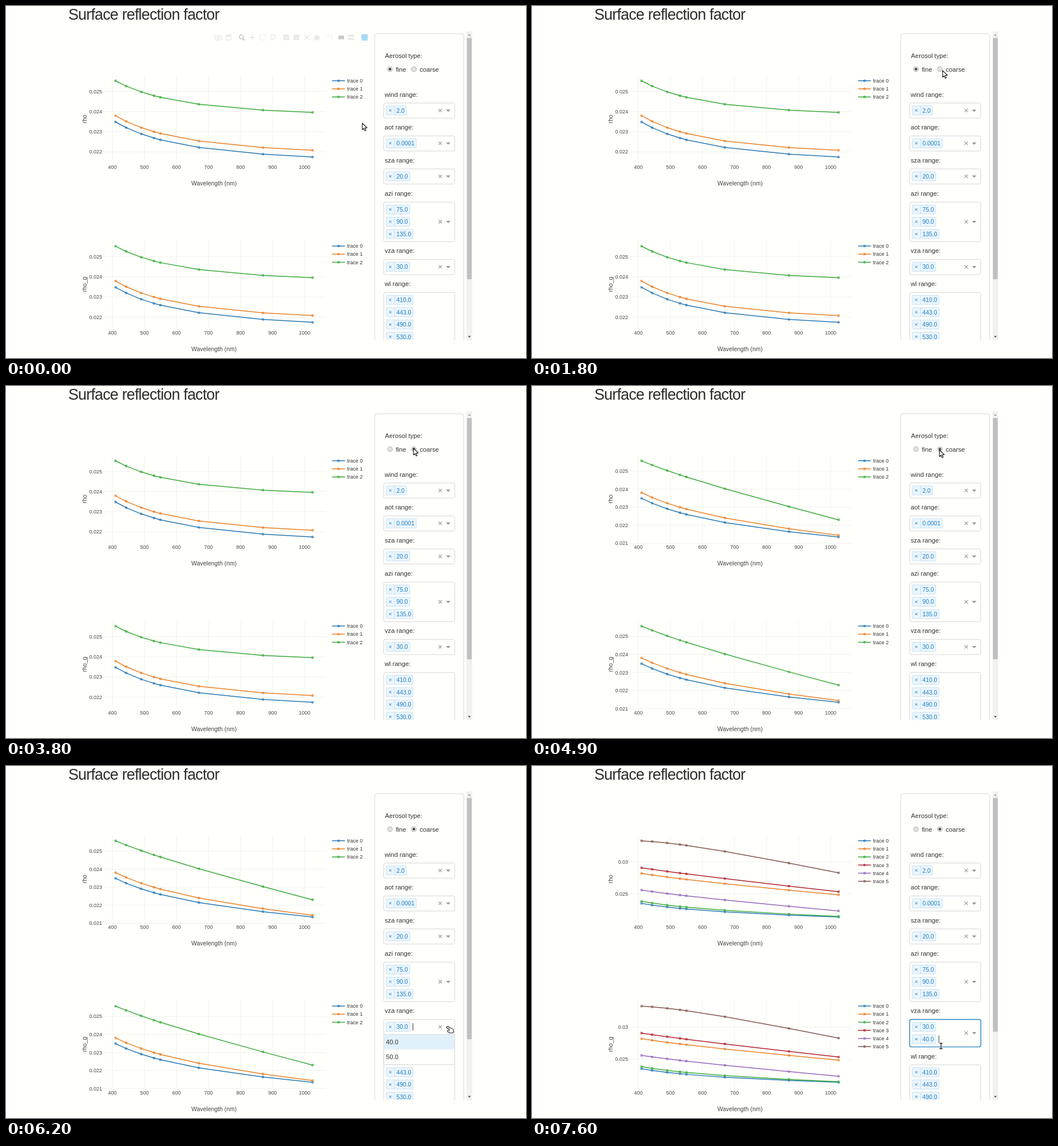
These frames come from a looping animation (909 by 616 pixels, 8000 ms). An HTML page with a canvas:

```html
<!DOCTYPE html>
<html lang="en">
<head>
<meta charset="utf-8">
<title>Surface reflection factor</title>
<style>
html, body { margin: 0; width: 100%; height: 100%; overflow: hidden; background: #fffffc; }
canvas { display: block; }
</style>
</head>
<body>
<canvas id="stage" width="909" height="616"></canvas>
<script>
const ctx = document.getElementById('stage').getContext('2d');
const LOOP = 8000, STEP = 100;
const BG = '#fffffc', GRID = '#eeeeec', BLUE = '#1a7fc4', EDGE = '#cccccc';
const TAG_BG = '#ebf5fc', TAG_EDGE = '#bcdcf4', GREY = '#999';
const FONT = '"Liberation Sans", Arial, sans-serif';
const SMALL = 8.96, MEDIUM = 10.45, LABEL = 11.2;
const COLORS = ['#2878b4', '#ea8026', '#3aab3a', '#b2222f', '#9467bd', '#85564e'];
const WAVES = [410, 443, 490, 530, 550, 670, 870, 1025];

// When things happen, in ms
const PRESS = 3700, CHECK = 3800, REDRAW = 4000, OPEN = 6200, PICK = 7600;

// A trace is its first and last value (in thousandths) and how much it bends.
const FINE = [[23.48, 21.745, 1], [23.79, 22.08, 1.02], [25.518, 23.956, 1.05]];
const COARSE = [[23.49, 21.345, 0.67], [23.81, 21.44, 0.565], [25.57, 22.3, 0.165]];
const ADDED = [[28.19, 24.82, 0.19], [29.07, 25.32, 0.1], [33.3, 28.28, -0.3]];
const WIDER = COARSE.flatMap((row, i) => [row, ADDED[i]]);

// Pointer moves: start, end, x, y
const MOVES = [
  [1100, 1800, 717, 112], [1800, 2000, 717, 108], [2000, 2500, 711.5, 108],
  [4800, 4900, 711.5, 111], [4900, 5000, 711.5, 266],
  [5300, 6200, 769.5, 455], [6700, 7400, 712.5, 488]
];

const mix = (a, b, k) => a + (b - a) * k;
const waveX = w => mix(191.5, 536, (w - 410) / 615);

// Share of the drop reached at a wavelength: power law blended with a straight line
function drop(w, bend) {
  const power = (1 - (w / 410) ** -1.8) / (1 - 2.5 ** -1.8);
  return mix((w - 410) / 615, power, bend);
}

function text(str, x, y, size, color = '#333', align = 'left') {
  ctx.font = `${size}px ${FONT}`;
  ctx.fillStyle = color;
  ctx.textAlign = align;
  ctx.fillText(str, x, y);
}

function line(points, color, width = 0.8) {
  ctx.beginPath();
  points.forEach(([x, y]) => ctx.lineTo(x, y));
  ctx.strokeStyle = color;
  ctx.lineWidth = width;
  ctx.stroke();
}

function shape(points, fill) {
  ctx.beginPath();
  points.forEach(([x, y]) => ctx.lineTo(x, y));
  ctx.fillStyle = fill;
  ctx.fill();
}

function paint(fill, stroke, width) {
  if (fill) { ctx.fillStyle = fill; ctx.fill(); }
  if (stroke) { ctx.strokeStyle = stroke; ctx.lineWidth = width; ctx.stroke(); }
}

function box(x, y, w, h, r, fill, stroke, width = 0.8) {
  ctx.beginPath();
  ctx.roundRect(x, y, w, h, r);
  paint(fill, stroke, width);
}

function disc(x, y, r, fill, stroke, width = 0.8) {
  ctx.beginPath();
  ctx.arc(x, y, r, 0, 7);
  paint(fill, stroke, width);
}

function cross(x, y, r, color, width) {
  for (const s of [-1, 1]) line([[x - r, y - r * s], [x + r, y + r * s]], color, width);
}

function triangle(x, y, w, h, color) {
  shape([[x - w / 2, y + h / 2], [x + w / 2, y + h / 2], [x, y - h / 2]], color);
}

function marker(x, y, color) {
  ctx.globalAlpha = 0.65;
  disc(x, y, 2.4, color);
  ctx.globalAlpha = 1;
}

function chart(rows, title, dy) {
  const top = Math.max(...rows.map(r => r[0])), low = Math.min(...rows.map(r => r[1]));
  const valueY = v => mix(131, 264.3, (top - v) / (top - low));
  ctx.save();
  ctx.translate(0, dy);
  for (let w = 400; w <= 1000; w += 100) {
    const x = waveX(w);
    line([[x, 121], [x, 275]], GRID);
    text(w, x, 285.3, SMALL, '#444', 'center');
  }
  const step = top - low > 6 ? 5 : 1;
  for (let v = Math.floor(top / step) * step; valueY(v) < 276; v -= step) {
    line([[170, valueY(v)], [559, valueY(v)]], GRID);
    text(v / 1000, 168, valueY(v) + 3.2, SMALL, '#444', 'right');
  }
  rows.forEach(([from, to, bend], i) => {
    const color = COLORS[i], keyY = 130.8 + i * 14.18;
    const points = WAVES.map(w => [waveX(w), valueY(mix(from, to, drop(w, bend)))]);
    line(points, color, 1.5);
    points.forEach(([x, y]) => marker(x, y, color));
    line([[570, keyY], [592.5, keyY]], color, 1.5);
    marker(581.3, keyY, color);
    text('trace ' + i, 596, keyY + 3.2, SMALL);
  });
  text('Wavelength (nm)', 363.6, 314.3, MEDIUM, '#444', 'center');
  ctx.translate(140.5, 197.7);
  ctx.rotate(-Math.PI / 2);
  text(title, 0, 0, MEDIUM, '#444', 'center');
  ctx.restore();
}

function modebar(alpha) {
  if (alpha <= 0) return;
  const soft = 'rgba(68,68,68,.3)', firm = 'rgba(68,68,68,.7)';
  ctx.save();
  ctx.globalAlpha = alpha;
  ctx.translate(0, 55);
  // camera, disk
  box(365.5, -3.5, 11, 8, 1, null, soft, 1.6);
  disc(371, 0.5, 2, null, soft, 1.5);
  box(384.5, -4.5, 9, 9, 1, null, soft, 1.3);
  box(386.5, -4, 5, 3, 0, soft);
  // zoom, pan
  disc(411.3, -1, 3.6, null, firm, 1.6);
  line([[414, 1.7], [417.3, 5]], firm, 2);
  line([[425.5, 0], [435.5, 0]], soft, 1.4);
  line([[430.5, -5], [430.5, 5]], soft, 1.4);
  // box, lasso, spikes
  ctx.setLineDash([2, 1.5]);
  box(443.5, -4.5, 10, 9, 0, null, soft, 1.3);
  line([[561, -3.5], [569.5, -3.5], [569.5, 5]], soft, 1.3);
  ctx.setLineDash([]);
  disc(466.5, -1, 4, null, soft, 1.4);
  line([[464, 2], [462, 5]], soft, 1.3);
  // plus, minus
  for (const x of [490, 507.5]) {
    box(x - 5, -4.7, 10, 9.4, 1, soft);
    line([[x - 3, 0], [x + 3, 0]], BG, 1.6);
  }
  line([[490, -3], [490, 3]], BG, 1.6);
  // autoscale, home
  cross(525.5, 0, 5, soft, 1.4);
  triangle(543.5, -2.2, 12, 5.5, soft);
  box(539.5, 0.5, 8, 4.5, 0, soft);
  // hover modes, square
  box(581, -3.2, 10, 6.4, 1, firm);
  for (const y of [-4.5, 1]) box(597.5, y, 11, 3.6, 0.5, soft);
  box(621.3, -5.5, 11, 11, 0, '#249fdc');
  ctx.restore();
}

function radio(x, label, on, pressed) {
  disc(x, 110.5, 4.3, pressed ? '#d4d4d4' : '#e2e2e2', '#a2a2a2');
  if (on) disc(x, 110.5, 2.2, '#484848');
  text(label, x + 10.2, 115.2, LABEL);
}

function tag(value, y) {
  ctx.font = `10.3px ${FONT}`;
  const w = ctx.measureText(value).width + 21.2;
  box(664.6, y - 8, w, 16, 1.5, TAG_BG, TAG_EDGE);
  line([[679.2, y - 8], [679.2, y + 8]], TAG_EDGE);
  cross(671.7, y, 1.9, BLUE, 1);
  text(value, 682.5, y + 3.8, 10.3, BLUE);
}

function select(name, top, height, values, { hot, up, tall } = {}) {
  const mid = top + height / 2 - 0.3;
  text(name + ' range:', 662, top - 11.2, LABEL);
  if (hot) box(660.3, top, 124.2, height, 3, null, 'rgba(26,127,196,.18)', 3);
  box(660.3, top, 124.2, height, 3, BG, hot ? BLUE : EDGE, hot ? 1.2 : 0.8);
  values.forEach((v, i) => tag(v, top + 12.9 + i * 21.5));
  if (tall) return;
  cross(759, mid, 2.9, GREY, 1.2);
  triangle(773, mid + 0.5, 8, up ? 4 : -4, GREY);
}

function caret(y) {
  line([[711.3, y - 6.3], [711.3, y + 6.3]], '#333', 1);
}

function menu() {
  box(660.3, 470, 124.2, 52.6, [0, 0, 3, 3], BG, EDGE);
  box(660.8, 470, 123.2, 26.2, 0, '#e1f1fb');
  text('40.0', 664.3, 487.3, LABEL);
  text('50.0', 664.3, 513.4, LABEL);
}

function panel(t) {
  const added = t >= PICK, open = t >= OPEN && !added;
  const grow = added ? 21.5 : 0;
  ctx.save();
  ctx.beginPath();
  ctx.rect(640, 40, 165, 544.5);
  ctx.clip();
  box(644.7, 48.7, 155.4, 600, 3, null, EDGE);
  text('Aerosol type:', 662.5, 91.4, LABEL);
  radio(671.2, 'fine', t < CHECK, false);
  radio(713, 'coarse', t >= CHECK, t >= PRESS && t < CHECK);

  select('wind', 169.8, 26.4, ['2.0']);
  select('aot', 227.4, 26.4, ['0.0001']);
  select('sza', 285.1, 26.4, ['20.0']);
  select('azi', 343.2, 69.4, ['75.0', '90.0', '135.0']);
  select('wl', 501.4 + grow, 180, ['410.0', '443.0', '490.0', '530.0'], { tall: true });
  select('vza', 443.6, 26.4 + grow, added ? ['30.0', '40.0'] : ['30.0'], { hot: added, up: open });
  if (open) menu();
  // The caret blinks from the moment the list opens and starts again on a pick.
  const since = t - (added ? PICK : OPEN);
  if (since >= 0 && since % 1000 < 500) caret(456.5 + grow);
  ctx.restore();

  box(805, 44.5, 10, 540, 0, '#f1f1f0');
  box(805.8, 56, 8.2, added ? 409 : 422.3, 0, '#c0c0c0');
  triangle(810, 50.5, 5, 3, '#a3a3a3');
  triangle(810, 579, 5, -3, '#505050');
}

function pointerAt(t) {
  let x = 622, y = 204;
  for (const [from, to, nx, ny] of MOVES) {
    const u = Math.min(1, Math.max(0, (t - from) / (to - from)));
    const k = u * u * (3 - 2 * u);
    x = mix(x, nx, k);
    y = mix(y, ny, k);
  }
  return [x, y];
}

function arrow() {
  const p = new Path2D('M.8 1V12.6L3.5 10.1L5.3 14.4L7.3 13.5L5.5 9.4L9.2 9.2Z');
  ctx.fillStyle = '#fff';
  ctx.fill(p);
  ctx.strokeStyle = '#151515';
  ctx.lineWidth = 1.1;
  ctx.stroke(p);
}

function hand() {
  const p = new Path2D('M2 2L8 5.5M3.5 9L8 9.5M7 5L11 6.5L11.5 10.5H7Z');
  ctx.lineCap = 'round';
  for (const [color, width] of [['#151515', 4], ['#fff', 2]]) {
    ctx.strokeStyle = color;
    ctx.lineWidth = width;
    ctx.stroke(p);
  }
  ctx.fillStyle = '#fff';
  ctx.fill(p);
}

function beam(x, y) {
  for (const [color, width] of [['#fff', 2.6], ['#111', 1.3]]) {
    line([[x, y - 4.8], [x, y + 4.8]], color, width);
    for (const d of [-4.8, 4.8]) line([[x - 2.7, y + d], [x + 2.7, y + d]], color, width);
  }
}

function pointer(t) {
  if (t >= PICK) return beam(715, 490);
  ctx.save();
  ctx.translate(...pointerAt(t));
  ctx.lineJoin = 'round';
  if (t >= 6000 && t < 6900) hand();
  else arrow();
  ctx.restore();
}

function barAlpha(t) {
  const fadeIn = 0.4 + t / 300, fadeOut = 1 - (t - 1200) / 300;
  return Math.min(1, fadeIn, fadeOut);
}

function draw(now) {
  const t = Math.floor((now % LOOP) / STEP) * STEP;
  ctx.fillStyle = BG;
  ctx.fillRect(0, 0, 909, 616);
  ctx.letterSpacing = '-0.8px';
  text('Surface reflection factor', 109, 23.8, 26.87, '#2d2d2d');
  ctx.letterSpacing = '0px';
  const rows = t < REDRAW ? FINE : t < PICK ? COARSE : WIDER;
  chart(rows, 'rho', 0);
  chart(rows, 'rho_g', 289.3);
  modebar(barAlpha(t));
  panel(t);
  pointer(t);
}

const start = performance.now();
function tick() {
  draw(performance.now() - start);
  requestAnimationFrame(tick);
}
tick();
</script>
</body>
</html>
```
